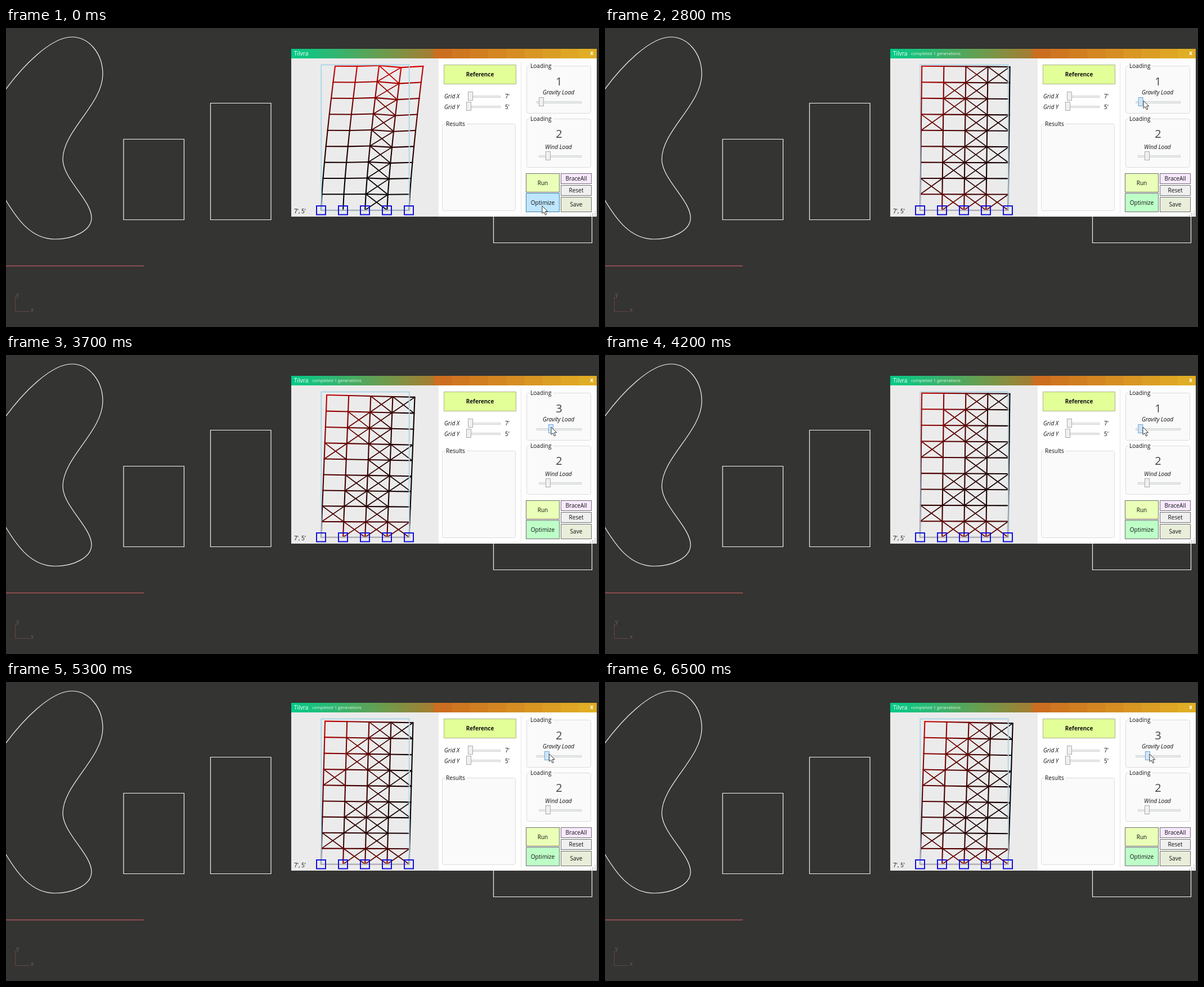
An HTML page with a canvas for the animation above (6600 ms loop, 1054x531 px).

```html
<!DOCTYPE html>
<html lang="en">
<head>
<meta charset="utf-8">
<title>Frame optimizer</title>
<style>
  html, body { margin: 0; width: 100%; height: 100%; overflow: hidden; background: #343432; }
  svg, canvas { position: absolute; left: 0; top: 0; width: 1054px; height: 531px; }
  text { font: 10.1px "Open Sans", "Noto Sans", sans-serif; fill: #111; }
  .mid { text-anchor: middle; }
  .it { font-style: italic; }
  .big { font-size: 20px; fill: #444; }
  .bold { font-weight: 700; font-size: 9.9px; }
  .wire { fill: none; stroke: #f4f4f4; stroke-width: 1.2; }
  .box { fill: #fafafa; stroke: #dcdcdc; }
  .track { fill: #e9ebec; stroke: #d3d5d6; }
  .thumb { fill: #f0f0f0; stroke: #acacac; }
</style>
</head>
<body>
<svg id="stage" viewBox="0 0 1054 531">
  <defs>
    <linearGradient id="bar">
      <stop offset="0" stop-color="#04cb88"/>
      <stop offset=".13" stop-color="#2bb974"/>
      <stop offset=".3" stop-color="#6b9c4e"/>
      <stop offset=".465" stop-color="#a77c30"/>
    </linearGradient>
  </defs>
  <path class="wire" d="M-2 111C30 67 80 16 117 16C148 16 172 46 172 82C172 135 101 183 101 233C101 268 152 306 152 337C152 360 120 375 87 375C45 375 20 340 -2 303"/>
  <path class="wire" d="M209 197.500H316.500V340.500H209ZM363.500 133.500H471V340.500H363.500ZM866.500 300H1041.500V381.500H866.500Z"/>
  <path d="M0 422.500H245" stroke="#a8545a" stroke-width="1.400"/>
  <path d="M16.500 477V503.500H42" fill="none" stroke="#664646"/>
  <text x="18" y="477" style="fill:#705c5c">y</text>
  <text x="44" y="504" style="fill:#705c5c">x</text>

  <rect x="507" y="37" width="543" height="298" fill="#fff"/>
  <rect x="507" y="54" width="262" height="281" fill="#ebebeb"/>
  <rect x="916" y="54" width="134" height="281" fill="#fdfdfd"/>
  <path d="M915.500 60V330" stroke="#e6e6e6"/>
  <rect x="507" y="37" width="543" height="17" fill="url(#bar)"/>
  <g id="blocks"></g>
  <text x="512" y="49" style="fill:#fff">Tilvra</text>
  <text id="status" x="544" y="48" style="fill:#e8f5e8;font-size:7.6px">completed 1 generations</text>
  <text class="mid bold" x="1041" y="48" style="fill:#fff">x</text>
  <g id="panel"></g>
  <g fill="#c4c4c4">
    <path d="M1046 325h2v2h-2zM1042 329h2v2h-2zM1046 329h2v2h-2zM1038 332h2v2h-2zM1042 332h2v2h-2zM1046 332h2v2h-2z"/>
  </g>
  <path id="cursor" d="M0 0V13.500L3.200 10.700L5.500 16L7.800 15L5.500 9.800H9.800Z" fill="#fff" stroke="#222" stroke-width=".9"/>
</svg>
<canvas id="truss" width="1054" height="531"></canvas>
<script>
const LOOP = 6600, STEP = 100, SOLVED = 400;
const $ = id => document.getElementById(id);

function add(parent, tag, attrs, text) {
  const el = document.createElementNS('http://www.w3.org/2000/svg', tag);
  for (const k in attrs) el.setAttribute(k, attrs[k]);
  if (text) el.textContent = text;
  return parent.appendChild(el);
}

const panel = $('panel');
const rect = (x, y, width, height, attrs) =>
  add(panel, 'rect', { x: x + .5, y: y + .5, width, height, ...attrs });
const label = (x, y, text, cls = '') => add(panel, 'text', { x, y, class: cls }, text);

function group(x, y, w, h, title, titleWidth) {
  rect(x, y, w, h, { class: 'box', rx: 3 });
  rect(x + 5, y - 2, titleWidth, 5, { fill: '#fcfcfc' });
  label(x + 7, y + 4, title);
}
function button(x, y, w, h, fill, text, stroke = '#707070', cls = '') {
  const face = rect(x, y, w, h, { fill, stroke });
  label(x + w / 2 + .5, y + h / 2 + 4.2, text, 'mid ' + cls);
  return face;
}
function slider(x, y, w, thumbX) {
  rect(x, y - 1, w, 3, { class: 'track' });
  return rect(thumbX, y - 8, 8, 15, { class: 'thumb' });
}

for (let i = 0; i < 9; i++) {
  const k = i / 8;
  add($('blocks'), 'rect', {
    x: 760 + i * 32.3, y: 37, width: 33, height: 17,
    fill: `rgb(${204 + 20 * k},${110 + 64 * k},${32 + 5 * k})`
  });
}
$('blocks').lastChild.setAttribute('width', 31.6);

button(778, 65, 128, 34, '#e3ff98', 'Reference', '#aab58a', 'bold');
label(779, 125, 'Grid X', 'it');
label(779, 144, 'Grid Y', 'it');
slider(822, 121, 56, 821);
slider(818, 139, 60, 818);
label(887, 125, "7'");
label(887, 144, "5'");
label(512, 329, "7', 5'");
group(775, 170, 130, 154, 'Results', 38);
group(925, 67, 114, 84, 'Loading', 42);
group(925, 161, 114, 86, 'Loading', 42);
const count = label(983, 102, '1', 'mid big');
label(983, 195, '2', 'mid big');
label(982, 118, 'Gravity Load', 'mid it');
label(982, 215, 'Wind Load', 'mid it');
const knob = slider(943, 131, 79, 947);
slider(947, 227, 75, 959);
button(924, 258, 59, 33, '#eaffb8', 'Run');
const optimize = button(924, 293, 59, 33, '#bee6fd', 'Optimize');
button(986, 258, 54, 18, '#f8e9ff', 'BraceAll');
button(986, 279, 54, 18, '#f0f0f0', 'Reset');
button(986, 300, 54, 26, '#e8eed9', 'Save');

// [ms, value...] tables, interpolated smoothly
const pointer = [
  [0, 953, 316], [700, 953, 314], [800, 952, 313], [1400, 942, 216], [1600, 943, 214],
  [2100, 959, 153], [2400, 957, 130], [2800, 957, 129], [3400, 971, 128], [3700, 969, 128],
  [4200, 956, 128], [4400, 956, 128], [4800, 969, 128], [5100, 970, 128], [5600, 957, 127],
  [5800, 953, 127], [6050, 970, 128], [6300, 961, 128], [6500, 968, 128]
];
const gravity = [
  [0, 1], [2600, 1], [2800, 1.1], [3400, 3.4], [3700, 3.43], [4200, 1.05], [4400, 1.1],
  [4800, 2.7], [5100, 3], [5600, 1.3], [5800, 1], [6050, 3.3], [6300, 1.7], [6500, 2.85]
];
const fade = [[0, 190, 230, 253], [800, 190, 230, 253], [1200, 190, 255, 200]];

function sample(table, t) {
  const n = table.findIndex(row => row[0] > t);
  if (n < 0) return table[table.length - 1].slice(1);
  const a = table[n - 1], b = table[n];
  const u = (t - a[0]) / (b[0] - a[0]), s = u * u * (3 - 2 * u);
  return a.slice(1).map((v, i) => v + (b[i + 1] - v) * s);
}

// Braced bays per storey, bottom to top
const startBraces = Array(9).fill('2');
const solvedBraces = ['123', '02', '12', '123', '2', '023', '12', '12', '23'];
const startSag = [1.6, 1.8, .6, 4, 1.8];
const ctx = $('truss').getContext('2d');

function node(i, j, load, solved) {
  const h = j / 9, sag = 1 - (1 - h) ** 2;
  const dx = solved ? 2.95 * load * h : 25 * h ** 1.3;
  const dy = solved ? (1.45 + .28 * i) * load : startSag[i];
  const red = solved
    ? 40 + 165 * h ** 1.5 * (1 - i / 4) + 95 * Math.max(0, 1 - j / 2) - 7 * i
    : 215 * h ** 2;
  return { x: 560 + 39.1 * i + dx, y: 323.5 - 28.6 * j + dy * sag, color: `rgb(${Math.round(red)},0,0)` };
}

function drawTruss(load, solved) {
  const at = (i, j) => node(i, j, load, solved);
  const line = (a, b) => {
    const g = ctx.createLinearGradient(a.x, a.y, b.x, b.y);
    g.addColorStop(0, a.color);
    g.addColorStop(1, b.color);
    ctx.strokeStyle = g;
    ctx.beginPath();
    ctx.moveTo(a.x, a.y);
    ctx.lineTo(b.x, b.y);
    ctx.stroke();
  };
  ctx.clearRect(500, 50, 270, 290);
  ctx.lineCap = 'round';
  for (let j = 0; j < 9; j++) {
    ctx.lineWidth = 1.7;
    for (const bay of (solved ? solvedBraces : startBraces)[j]) {
      const i = +bay;
      line(at(i, j), at(i + 1, j + 1));
      line(at(i + 1, j), at(i, j + 1));
    }
    ctx.lineWidth = 2.1;
    for (let i = 0; i < 5; i++) {
      line(at(i, j), at(i, j + 1));
      if (i < 4) line(at(i, j + 1), at(i + 1, j + 1));
    }
  }
  ctx.lineWidth = 1.8;
  ctx.strokeStyle = '#a9d5e5';
  ctx.strokeRect(560.3, 65.5, 156.4, 258);
  ctx.lineWidth = 2;
  ctx.strokeStyle = solved ? '#b3a4ae' : '#a3adb8';
  ctx.beginPath();
  ctx.moveTo(560, 323.7);
  ctx.lineTo(716.5, 323.7);
  ctx.stroke();
  ctx.strokeStyle = '#1212dc';
  for (let i = 0; i < 5; i++) ctx.strokeRect(552 + Math.round(39.1 * i), 316, 16, 15.5);
}

function render(t) {
  const [x, y] = sample(pointer, t);
  const [load] = sample(gravity, t);
  const solved = t >= SOLVED, hot = t >= 2400;
  drawTruss(load, solved);
  $('cursor').setAttribute('transform', `translate(${x} ${y})`);
  $('status').setAttribute('visibility', solved ? 'visible' : 'hidden');
  count.textContent = Math.round(load);
  knob.setAttribute('x', 947.5 + (load - 1) * 7);
  knob.style.fill = hot ? '#cfe6f8' : '';
  knob.style.stroke = hot ? '#6ba6dc' : '';
  optimize.setAttribute('fill', `rgb(${sample(fade, t).map(Math.round)})`);
  optimize.setAttribute('stroke', t < 900 ? '#3c7fb1' : '#707070');
}

const start = performance.now();
function tick() {
  const t = (performance.now() - start) % LOOP;
  render(Math.floor(t / STEP) * STEP);
  requestAnimationFrame(tick);
}
tick();
</script>
</body>
</html>
```
